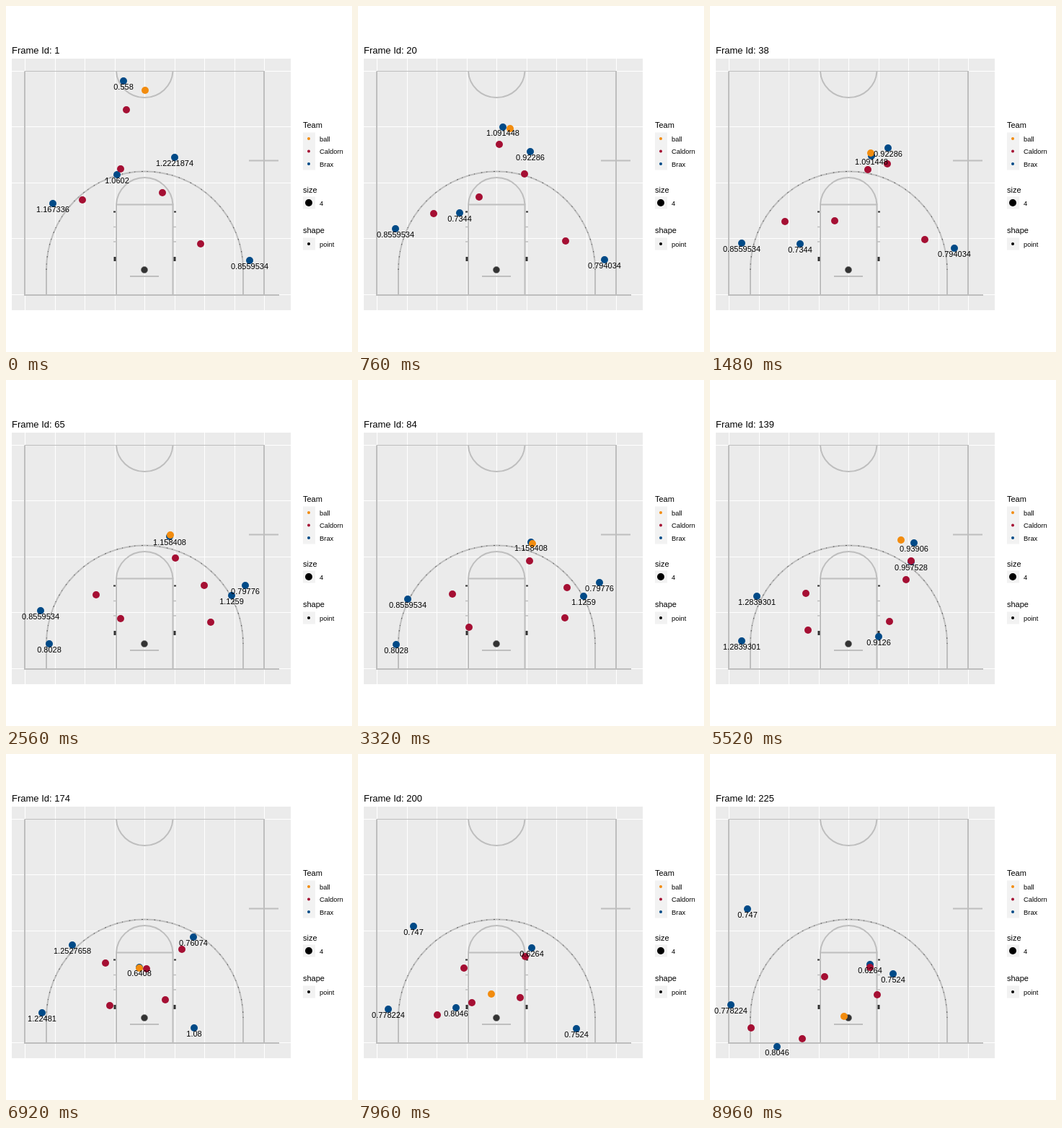
Write an HTML page that moves like this. It is 480 by 480 pixels and loops after 9 s.

```html
<!DOCTYPE html>
<html>
<head>
<meta charset="utf-8">
<style>
  html, body { margin: 0; width: 100%; height: 100%; overflow: hidden; background: #fff; }
  svg { display: block; width: 480px; height: 480px; font: 11px "Liberation Sans", Arial, sans-serif; }
  .court { fill: none; stroke: #bebebe; stroke-width: 2; }
  .key { fill: #f2f2f2; }
  .small { font-size: 9.4px; }
  .ball { fill: #f28c0f; }
  .red { fill: #a50f33; }
  .blue { fill: #004a87; }
</style>
</head>
<body>
<svg viewBox="0 0 480 480">
  <rect x="8" y="73" width="387" height="349" fill="#ebebeb"/>
  <g id="grid" stroke="#fff" shape-rendering="crispEdges"></g>

  <g class="court">
    <path d="M379 401H26V90.5M358 90V401M337 214.5H378M153 401V275.5H231.5V401M172 375H212"/>
    <path d="M26 90.5H358" stroke-width="1.2"/>
    <path d="M153 90.5A39.3 38.5 0 0 0 231.5 90.5M153 275.5A39.3 39.5 0 0 1 231.5 275.5"/>
    <path d="M56 401V366A136.5 136.5 0 0 1 329 366V401"/>
    <path d="M56 366A136.5 136.5 0 0 1 329 366" stroke="#333" stroke-width="1" stroke-dasharray="1.5 6 1 9"/>
    <path d="M149 306.5h3M149 327h3M232 306.5h4M232 327h4" stroke-width="1.5"/>
    <path d="M149 285.5h3M233 285.5h3" stroke="#333"/>
    <path d="M151 348v6M234 348v6" stroke="#333" stroke-width="3"/>
  </g>
  <circle cx="192" cy="366" r="4.6" fill="#333" stroke="#777" stroke-width=".6"/>

  <g id="dots"></g>
  <g id="labels" text-anchor="middle"></g>
  <text id="title" x="8" y="66" font-size="13"></text>

  <text x="412" y="169">Team</text>
  <text x="412" y="259">size</text>
  <text x="412" y="315">shape</text>
  <path class="key" d="M412 175.500h17v52h-17zM412 264.500h17v17h-17zM412 321.500h17v17h-17z"/>
  <circle class="ball" cx="420" cy="184" r="2"/>
  <circle class="red" cx="420" cy="201.500" r="2"/>
  <circle class="blue" cx="420" cy="219" r="2"/>
  <circle cx="420" cy="273" r="5"/>
  <circle cx="420" cy="330" r="2"/>
  <g class="small">
    <text x="435" y="188">ball</text>
    <text x="435" y="205">Caldorn</text>
    <text x="435" y="223">Brax</text>
    <text x="435" y="277">4</text>
    <text x="435" y="334">point</text>
  </g>
</svg>
<script>
const STEP = 40, FRAMES = 225;
const times = [0, 1480, 2560, 4120, 5520, 6920, 8960];
const $ = id => document.getElementById(id);

function add(parent, tag, attrs) {
  const el = document.createElementNS('http://www.w3.org/2000/svg', tag);
  for (const k in attrs) el.setAttribute(k, attrs[k]);
  return parent.appendChild(el);
}

for (let i = 0; i < 9; i++) add($('grid'), 'path', { d: `M${Math.round(26 + i * 41.5) + .5} 73V422` });
for (let i = 0; i < 5; i++) add($('grid'), 'path', { d: `M8 ${Math.floor(90 + i * 77.6) + .5}H395` });

// "x,y" poses at the shared times, plus optional [time, x, y] waypoints
function track(poses, ...extra) {
  const keys = poses.split(' ').map((p, i) => [times[i], ...p.split(',').map(Number)]);
  return keys.concat(extra).sort((a, b) => a[0] - b[0]);
}

const blue = [
  { path: track('163,104 224,208 227,217 259,234 279,252 260,254 222,292'),
    values: '0.558 1.091448 1.158408 1.127997 0.957528 0.76074 0.6264' },
  { path: track('234,210 247,197 313,299 311,301 234,356 261,380 254,305', [7800, 306, 384], [8320, 288, 360]),
    values: '1.2221874 0.92286 1.1259 0.8559 0.9126 1.08 0.7524' },
  { path: track('154,234 125,330 60,366 49,367 44,362 50,359 29,348'),
    values: '1.0602 0.7344 0.8028 1.2839301 1.2839301 1.22481 0.778224' },
  { path: track('65,274 44,329 48,320 88,291 65,300 92,265 52,215'),
    values: '1.167336 0.8559534 0.8559534 0.8568 1.2839301 1.2527658 0.747' },
  { path: track('338,353 339,336 332,285 339,276 283,226 185,296 93,406', [940, 342, 351]),
    values: '0.8559534 0.794034 0.79776 0.762414 0.93906 0.6408 0.8046' }
];
const red = [
  '167,144 219,227 235,247 242,255 272,277 244,271 222,296',
  '217,259 246,219 275,285 299,289 279,251 195,298 128,395',
  '106,269 104,299 125,298 134,296 133,296 138,290 159,309',
  '159,226 173,298 159,331 149,349 136,347 144,349 57,380',
  '270,330 298,324 284,336 291,324 249,335 221,341 232,334'
].map(p => ({ path: track(p) }));
const ball = { path: track('193,117 223,204 228,215 258,235 265,222 185,297 186,364') };

function addDots(list, cls) {
  for (const d of list) d.dot = add($('dots'), 'circle', { class: cls, r: 5 });
}
addDots(blue, 'blue');
addDots(red, 'red');
addDots([ball], 'ball');
for (const d of blue) {
  d.values = d.values.split(' ');
  d.label = add($('labels'), 'text', {});
}
const all = [...blue, ...red, ball];

// Monotone cubic: smooth, without overshoot
function at(path, t, axis) {
  const slope = i => path[i] && path[i + 1]
    ? (path[i + 1][axis] - path[i][axis]) / (path[i + 1][0] - path[i][0]) : null;
  const tangent = i => {
    const a = slope(i - 1), b = slope(i);
    if (a === null) return b;
    if (b === null) return a;
    return a * b > 0 ? 2 * a * b / (a + b) : 0;
  };
  let i = 0;
  while (i < path.length - 2 && t >= path[i + 1][0]) i++;
  const p = path[i], q = path[i + 1], h = q[0] - p[0], u = (t - p[0]) / h, v = 1 - u;
  return v * v * ((1 + 2 * u) * p[axis] + u * h * tangent(i))
    + u * u * ((1 + 2 * v) * q[axis] - v * h * tangent(i + 1));
}

function draw(n) {
  const t = n * STEP;
  $('title').textContent = 'Frame Id: ' + (n + 1);
  let nearest = 0;
  times.forEach((k, i) => { if (Math.abs(k - t) < Math.abs(times[nearest] - t)) nearest = i; });
  for (const d of all) {
    const x = Math.round(at(d.path, t, 1)), y = Math.round(at(d.path, t, 2));
    d.dot.setAttribute('cx', x);
    d.dot.setAttribute('cy', y);
    if (d.label) {
      d.label.setAttribute('x', x);
      d.label.setAttribute('y', y + 12);
      d.label.textContent = d.values[nearest];
    }
  }
}

const start = performance.now();
function loop() {
  draw(Math.floor((performance.now() - start) / STEP) % FRAMES);
  requestAnimationFrame(loop);
}
loop();
</script>
</body>
</html>
```
